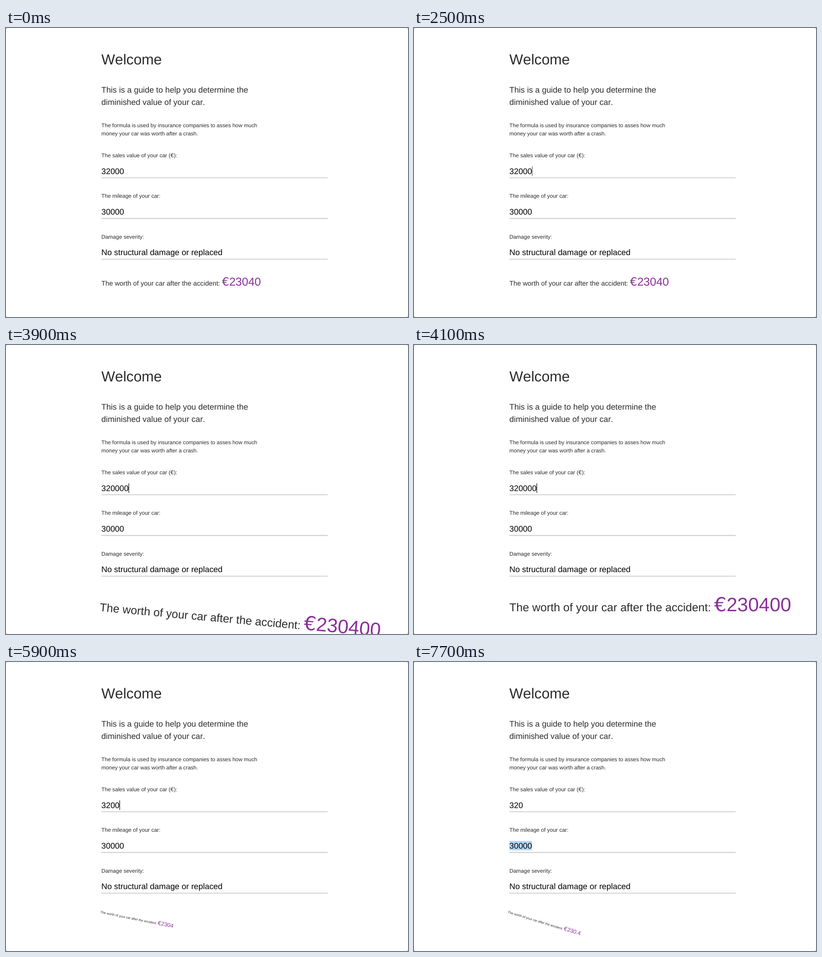
An HTML page for the animation above (8 s loop, 881 px wide and 635 px high).

```html
<!DOCTYPE html>
<html lang="en">
<head>
<meta charset="utf-8">
<title>Diminished value</title>
<style>
  html, body { margin: 0; height: 100%; overflow: hidden; background: #777; }
  svg {
    display: block; width: 881px; height: 635px; background: #fff; border-radius: 3px;
    font-family: "Liberation Sans", Arial, sans-serif; fill: #2b2b2b;
    font-kerning: none; text-rendering: geometricPrecision;
  }
  .title { font-size: 31.8px; }
  .lead { font-size: 17.87px; }
  .note { font-size: 11.92px; }
  .label { font-size: 12px; }
  .input { font-size: 17.9px; fill: #000; }
  .euro { font-family: "DejaVu Sans", sans-serif; }
  .amount { font-size: 1.7em; fill: #8b2f9a; }
  .rules { stroke: #ccc; stroke-width: 1.8; }
</style>
</head>
<body>
<svg viewBox="0 0 881 635">
  <text class="title" x="209" y="80">Welcome</text>
  <g class="lead">
    <text x="209" y="142">This is a guide to help you determine the</text>
    <text x="209" y="168.8">diminished value of your car.</text>
  </g>
  <g class="note">
    <text x="209" y="218.3">The formula is used by insurance companies to asses how much</text>
    <text x="209" y="236.2">money your car was worth after a crash.</text>
  </g>
  <g class="label">
    <text x="209" y="284">The sales value of your car (<tspan class="euro">€</tspan>):</text>
    <text x="209" y="373.3">The mileage of your car:</text>
    <text x="209" y="462.6">Damage severity:</text>
  </g>
  <path class="rules" d="M209 329.2H705M209 418.5H705M209 507.8H705"/>
  <rect id="selection" x="209" y="393" width="49.5" height="21" fill="#b9d7fc"/>
  <g class="input">
    <text id="price" x="209" y="320.5"></text>
    <text x="209" y="410">30000</text>
    <text x="209" y="499.2">No structural damage or replaced</text>
  </g>
  <rect id="caret" y="304" width="1.2" height="21" fill="#000"/>
  <g id="result">
    <text id="worth">The worth of your car after the accident: <tspan class="amount"><tspan class="euro">€</tspan><tspan id="amount"></tspan></tspan></text>
  </g>
</svg>
<script>
const LOOP = 8000, TURN = 220, FOCUS_NEXT = 7300;
const $ = id => document.getElementById(id);
const [price, caret, selection, result, worth, amount] =
  ['price', 'caret', 'selection', 'result', 'worth', 'amount'].map($);

// [time, sales value]
const edits = [[0, 32000], [3600, 320000], [5080, 32000], [5560, 3200], [6020, 320]];
// [start, font size, tilt in radians]
const poses = [[-TURN, 14.72, 0], [3600, 25, .1], [3860, 25, 0],
  [5095, 14.72, .1], [5560, 7.15, .2], [6020, 7.15, .3]];
// [on, off]
const blinks = [[100, 500], [1000, 1500], [2000, 2500], [3000, 4500], [5500, 6400], [7000, FOCUS_NEXT]];

const clamp = v => Math.max(0, Math.min(1, v));
const smooth = p => p * p * (3 - 2 * p);
const fade = (t, start) => clamp((t - start + 50) / 150);

function poseAt(t) {
  let [, size, tilt] = poses[0];
  for (const [start, nextSize, nextTilt] of poses) {
    const p = smooth(clamp((t - start) / TURN));
    size += (nextSize - size) * p;
    tilt += (nextTilt - tilt) * p;
  }
  return [size, tilt * 180 / Math.PI];
}

function draw(t) {
  const value = edits.filter(([start]) => start <= t).pop()[1];
  price.textContent = value;
  amount.textContent = value * 72 / 100;

  caret.setAttribute('x', 208.8 + String(value).length * 9.95);
  caret.setAttribute('opacity', t >= FOCUS_NEXT ? 0 :
    blinks.reduce((sum, [on, off]) => sum + fade(t, on) - fade(t, off), 0));
  selection.setAttribute('opacity', t >= FOCUS_NEXT ? 1 : 0);

  const [size, angle] = poseAt(t);
  result.setAttribute('transform', `translate(209 538.8) rotate(${angle})`);
  worth.setAttribute('font-size', size);
  worth.setAttribute('y', size * 1.836);
}

function tick() {
  draw(performance.now() % LOOP);
  requestAnimationFrame(tick);
}
tick();
</script>
</body>
</html>
```
